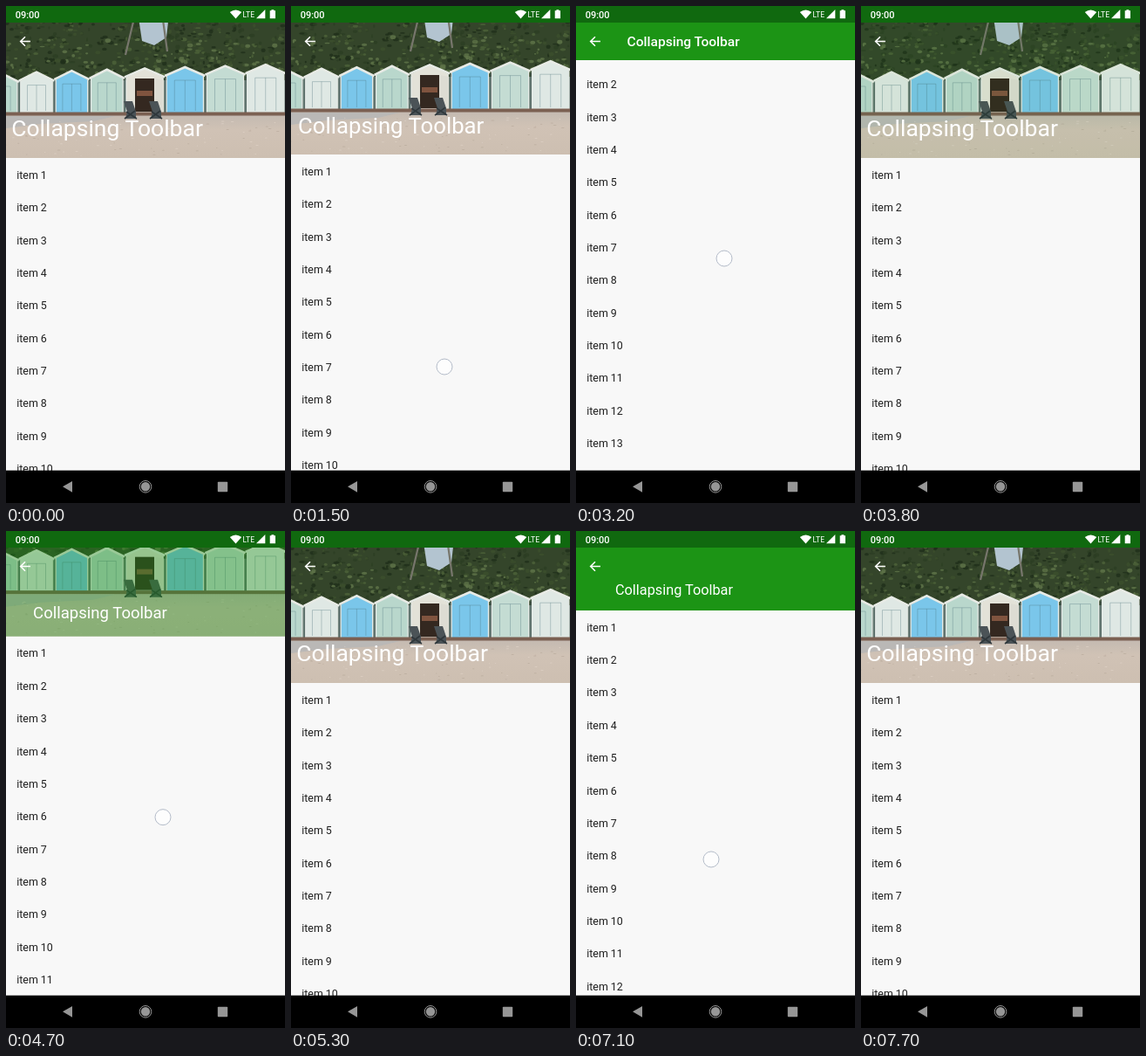
Animation of 320 by 569 pixels, one loop 7800 ms. Source, as an HTML page:

```html
<!DOCTYPE html>
<html lang="en">
<head>
<meta charset="utf-8">
<title>Collapsing Toolbar</title>
<style>
  html, body { margin: 0; height: 100%; overflow: hidden; background: #f8f8f8; }
  svg { display: block; width: 100vw; height: 100vh; font-family: Roboto, sans-serif; }
  #list { font-size: 12.45px; fill: #202020; }
</style>
</head>
<body>
<svg viewBox="0 0 320 569" preserveAspectRatio="none">
  <defs>
    <linearGradient id="sand" x2="0" y2="1">
      <stop offset="0" stop-color="#c4bab1"/>
      <stop offset=".35" stop-color="#d0c2b5"/>
      <stop offset="1" stop-color="#cdbfb1"/>
    </linearGradient>
  </defs>
  <rect width="320" height="569" fill="#f8f8f8"/>
  <g id="list"></g>
  <circle id="touch" r="9" fill="#fff" fill-opacity=".65" stroke="#b4bcc9"/>
  <g id="photo"></g>
  <rect id="scrim" width="320" fill="#1c9415"/>
  <path d="M28 40.5H17M22 35.2L16.7 40.5L22 45.8" fill="none" stroke="#fff" stroke-width="1.6"/>
  <text id="title" fill="#fff">Collapsing Toolbar</text>
  <g fill="#fff">
    <rect width="320" height="19" fill="#10690f"/>
    <text x="10.7" y="13.6" font-size="11" font-weight="500">09:00</text>
    <path d="M256.8 7Q263.5 2 270.2 7L263.5 14.6Z"/>
    <text x="271.6" y="13" font-size="8.6">LTE</text>
    <path d="M287 14.3L297.3 4V14.3Z"/>
    <path d="M302.7 5.3H304.4V4.2H307.3V5.3H309V14.3H302.7Z"/>
  </g>
  <g fill="#969696">
    <rect y="531.7" width="320" height="38" fill="#000"/>
    <path d="M65 550.3L76 544V556.7Z"/>
    <circle cx="160" cy="550.3" r="6.8" fill="none" stroke="#969696"/>
    <circle cx="160" cy="550.3" r="5.2"/>
    <rect x="242.8" y="544.8" width="11.4" height="11.4" rx=".8"/>
  </g>
</svg>
<script>
const LOOP = 7800, STEP = 100;
const EXPANDED = 174, COLLAPSED = 62, ROW = 37.37;
const SCRIM_HEIGHT = 105, SCRIM_FADE = 600;

// Each swipe eases the list to a scroll offset; x and y place the finger at offset 0
const SWIPES = [
  { from: 1400, to: 2500, scroll: 171, x: 176, y: 417 },
  { from: 3000, to: 3750, scroll: 0, x: 170, y: 430 },
  { from: 3950, to: 4400, scroll: 90, x: 180, y: 381 },
  { from: 4400, to: 5085, scroll: 0, x: 180, y: 381 },
  { from: 5500, to: 6340, scroll: 140, x: 170, y: 402 },
  { from: 6750, to: 7550, scroll: 0, x: 155, y: 459 },
];
const RELEASE = 0.8;

const $ = id => document.getElementById(id);
const mix = (a, b, k) => a + (b - a) * k;
const clamp = k => Math.min(1, Math.max(0, k));
const ease = k => k * k * (3 - 2 * k);
const progress = (swipe, t) => clamp((t - swipe.from) / (swipe.to - swipe.from));

const scrollAt = t => SWIPES.reduce((pos, s) => mix(pos, s.scroll, ease(progress(s, t))), 0);
const heightAt = t => Math.max(COLLAPSED, EXPANDED - scrollAt(t));

// The scrim fades in or out whenever the header crosses SCRIM_HEIGHT
function scrimAt(time) {
  let shown = false, since = -SCRIM_FADE, base = 0, alpha = 0;
  for (let t = 0; t <= time; t += 10) {
    const show = heightAt(t) < SCRIM_HEIGHT;
    if (show !== shown) [shown, since, base] = [show, t, alpha];
    const k = clamp((t - since) / SCRIM_FADE);
    alpha = shown ? Math.min(1, base + k) : base * (1 - k) ** 3;
  }
  return alpha;
}

function set(el, attrs) {
  for (const key in attrs) el.setAttribute(key, attrs[key]);
}

function add(parent, tag, attrs, text = '') {
  const el = document.createElementNS('http://www.w3.org/2000/svg', tag);
  set(el, attrs);
  el.textContent = text;
  return parent.appendChild(el);
}

const line = (g, d, stroke, width) =>
  add(g, 'path', { d, fill: 'none', stroke, 'stroke-width': width });

let seed = 7;
const random = (lo, hi) => {
  seed = (seed * 16807) % 2147483647;
  return mix(lo, hi, seed / 2147483647);
};

function drawTrees(g) {
  add(g, 'rect', { width: 320, height: 130, fill: '#34452a' });
  const greens = ['#1f2e1a', '#2c3d23', '#3c4f2d', '#4e633a', '#60764a'];
  for (let i = 0; i < 600; i++) {
    const y = random(16, 86);
    add(g, 'ellipse', {
      cx: random(0, 320), cy: y, rx: random(1, 3.5), ry: random(.8, 2.5),
      fill: greens[Math.floor(random(0, y > 38 ? 5 : 3.5))], opacity: .8,
    });
  }
  add(g, 'path', { d: 'M150 0H188L184 36L170 45L156 40Z', fill: '#b3c4d0' });
  line(g, 'M146 18L137 56M180 16L185 52', '#77766c', 2.2);
}

function drawHut(g, left, width, peak, wall, open) {
  const right = left + width, mid = left + width / 2, eave = peak + 10;
  add(g, 'path', { d: `M${left + 2} 122V${eave}L${mid} ${peak}L${right - 2} ${eave}V122Z`, fill: wall });
  line(g, `M${left + 2} ${eave}V122M${right - 2} ${eave}V122`, '#e6ece8', 1.2);
  line(g, `M${left + .5} ${eave + 2}V122`, '#4d6260', 1);
  line(g, `M${left} ${eave}L${mid} ${peak}L${right} ${eave}`, '#e8ebe6', 2.6);
  if (open) {
    add(g, 'rect', { x: 148, y: 83, width: 22, height: 38, fill: '#342820' });
    add(g, 'path', { d: 'M150 97H168V103H150Z', fill: '#80543f' });
    add(g, 'path', { d: 'M170 83L181 85V121H170Z', fill: '#dddcd3' });
  } else {
    const inset = width * .24;
    line(g, `M${left + inset} 120V${eave + 5}H${right - inset}V120M${mid} ${eave + 5}V120`, '#466c7566', .8);
  }
}

function drawChair(g, x) {
  add(g, 'path', { d: `M${x} 109H${x + 10}L${x + 14} 121V129H${x + 2}L${x + 4} 121Z`, fill: '#4b5357' });
  line(g, `M${x + 1} 129L${x + 13} 120M${x + 3} 121L${x + 15} 129`, '#2f373b', 1.6);
}

function drawPhoto(g) {
  drawTrees(g);
  add(g, 'rect', { y: 85, width: 320, height: 40, fill: '#75877f' });
  const mint = '#b9d7cc', blue = '#7ac6ea', white = '#dfe8e4';
  let left = -25.6;
  [mint, white, blue, mint, '#e3e2d8', blue, '#c4dcd3', white].forEach((wall, i) => {
    const width = i < 4 ? 40.4 : 46.2;
    drawHut(g, left, width, 77 - 1.4 * i, wall, i === 4);
    left += width;
  });
  add(g, 'rect', { y: 125, width: 320, height: 49, fill: 'url(#sand)' });
  add(g, 'rect', { y: 121.5, width: 320, height: 4, fill: '#7b6052' });
  add(g, 'path', { d: 'M0 126H125L100 132L40 135L0 140Z', fill: '#bab8b6' });
  for (let i = 0; i < 90; i++) {
    add(g, 'ellipse', {
      cx: random(0, 320), cy: random(132, 173), rx: random(.5, 2), ry: .5,
      fill: i % 2 ? '#b8a99b' : '#dfd3c7', opacity: .7,
    });
  }
  drawChair(g, 135);
  drawChair(g, 164);
}

function render(t) {
  const scroll = scrollAt(t), height = heightAt(t);
  const k = (EXPANDED - height) / (EXPANDED - COLLAPSED);

  set($('list'), { transform: `translate(0 ${-scroll})` });
  set($('photo'), { transform: `translate(0 ${height - EXPANDED})` });
  set($('scrim'), { height, opacity: scrimAt(t) });
  set($('title'), {
    x: mix(6.2, 58.5, k), y: mix(149.3, 46.2, k),
    'font-size': mix(26.5, 15.56, 1 - (1 - k) ** 2),
    'font-weight': k === 1 ? 500 : 400,
  });

  const swipe = SWIPES.find(s => t >= s.from && progress(s, t) < RELEASE);
  set($('touch'), { visibility: swipe ? 'visible' : 'hidden' });
  if (swipe) set($('touch'), { cx: swipe.x, cy: swipe.y - scroll });
}

for (let i = 0; i < 18; i++) {
  add($('list'), 'text', { x: 12.2, y: 197.8 + i * ROW }, `item ${i + 1}`);
}
drawPhoto($('photo'));

const start = performance.now();
function tick() {
  const t = (performance.now() - start) % LOOP;
  render(Math.floor(t / STEP) * STEP);
  requestAnimationFrame(tick);
}
tick();
</script>
</body>
</html>
```
